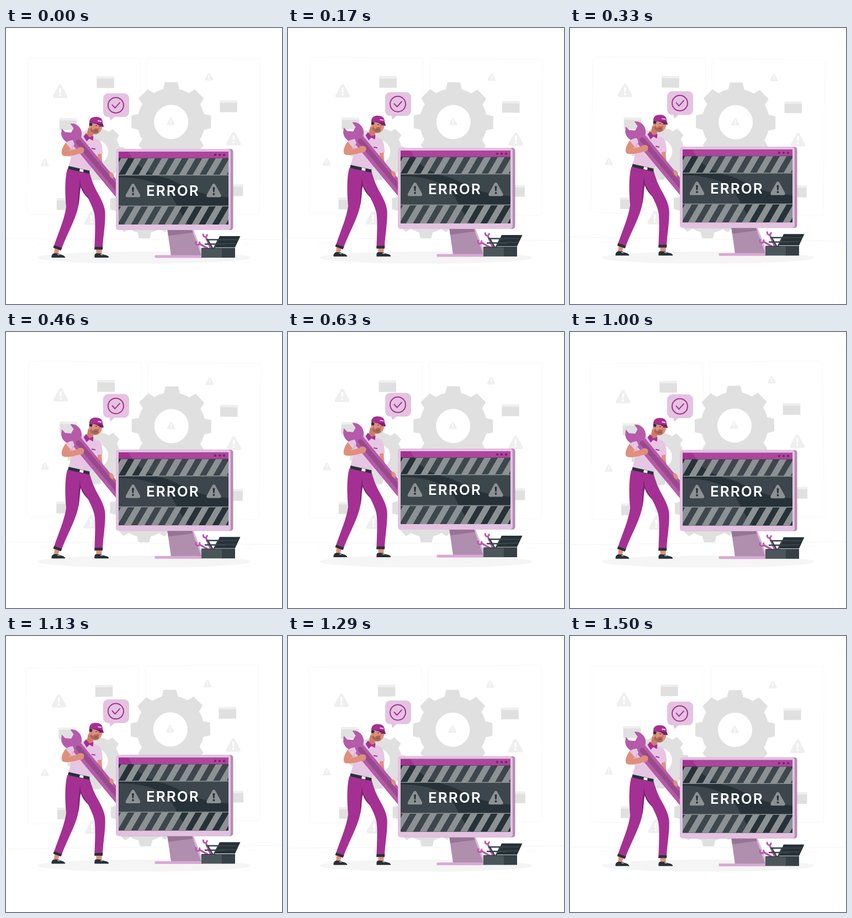
Recreate the animation shown at these times as an HTML page. Size 500x500 px, loop 1540 ms.

```html
<!DOCTYPE html>
<html lang="en">
<head>
<meta charset="utf-8">
<title>Error repair</title>
<style>
  html, body { margin: 0; width: 100%; height: 100%; overflow: hidden; background: #fff; }
  svg { display: block; width: 100vw; height: 100vh; }
  .word { font: 600 26px Inter, "Open Sans", sans-serif; letter-spacing: 2px; fill: #fff; }
  .dark { fill: #263238; }
  .main { fill: #a53093; }
  .pale { fill: #e4c3e0; }
  .skin { fill: #e08f7c; }
</style>
</head>
<body>
<svg viewBox="0 0 500 500" xmlns="http://www.w3.org/2000/svg">
  <defs>
    <path id="tooth" d="M-15 -57 L-11.5 -72 H11.5 L15 -57Z"/>
    <g id="gear" fill="#e0e0e0">
      <circle r="46" fill="none" stroke="#e0e0e0" stroke-width="30"/>
      <g id="teeth"></g>
    </g>
    <g id="box">
      <rect width="31.5" height="21" fill="#e0e0e0"/>
      <rect width="31.5" height="4" fill="#efefef"/>
    </g>
    <g id="warn">
      <path d="M-2.6 -11 Q0 -14.5 2.6 -11 L12.8 7.5 Q14.3 11.8 10.5 12 H-10.5 Q-14.3 11.8 -12.8 7.5Z"/>
      <path d="M-1.9 -6 H1.9 L1.2 3 H-1.2Z" fill="currentColor"/>
      <circle cy="6.4" r="1.9" fill="currentColor"/>
    </g>
    <clipPath id="screen"><rect x="204" y="224.5" width="199" height="132"/></clipPath>
    <clipPath id="bands"><path d="M204 236.5H403V267H204Z M204 323.5H403V356.5H204Z"/></clipPath>
  </defs>

  <g id="back">
    <g fill="none" stroke="#f8f8f8">
      <rect x="39" y="55" width="204" height="282.5" rx="4"/>
      <rect x="255" y="55" width="204.5" height="282.5" rx="4"/>
      <path d="M0 382.5H500" stroke="#f3f3f3"/>
      <path d="M54 391H88 M96 391H110 M430 391H450"/>
    </g>
    <use href="#gear" transform="translate(299 170)"/>
    <use href="#gear" transform="translate(163 225) scale(.71)"/>
    <use href="#gear" transform="translate(251 319) scale(.86)"/>
    <use href="#box" x="164" y="88"/>
    <use href="#box" x="387" y="131"/>
    <use href="#box" x="96.5" y="164"/>
    <use href="#box" x="92" y="309"/>
    <use href="#box" x="398" y="283"/>
    <g fill="#efefef" color="#fff">
      <use href="#warn" transform="translate(97.7 115.5)"/>
      <use href="#warn" transform="translate(412.3 200)"/>
      <use href="#warn" transform="translate(155 345)"/>
      <use href="#warn" transform="translate(70.3 244.5) scale(.55)"/>
      <use href="#warn" transform="translate(367.3 88) scale(.55)"/>
      <use href="#warn" transform="translate(298.3 169) scale(.55)"/>
    </g>
  </g>

  <ellipse cx="250" cy="416" rx="193" ry="11" fill="#f5f5f5"/>

  <g id="front">
    <!-- speech bubble -->
    <path class="pale" d="M187 160 L189 168.500 L198 160Z"/>
    <rect class="pale" x="176" y="118.700" width="47" height="43" rx="9"/>
    <g fill="none" stroke="#a53093" stroke-width="2">
      <circle cx="199" cy="140.300" r="14"/>
      <path d="M192.500 139.800 L197.500 145.300 L206 135.800" stroke-linecap="round" stroke-linejoin="round"/>
    </g>

    <!-- legs -->
    <path class="skin" d="M88 398 L97 401 L94 411 L87 411Z M163 400 H174 L173 411 H164Z"/>
    <path class="dark" d="M82.500 416.500 C82 411 85 409 88 408.500 L95 409 C99 412 106 411 107.500 416.500Z
      M160.500 416.500 C160 411 161 409 164 408.500 L172 409 C176 412 184 411 186 415 V416.500Z"/>
    <path d="M93 410.500 L97 411.500 M171 410.500 L175 411.500" stroke="#fff" stroke-width="1"/>
    <path class="main" d="M111 256 C106 275 107 303 109 325 C106 347 95 371 87 395 L101 400
      C109 377 127 346 131 323 C133 307 133 296 135 280 C142 298 156 320 159.500 335
      C163 347 161 380 160.500 398 H175 C176 378 181 350 179.500 333 C177 314 165 300 159 285
      C155 275 153 268 151 261Z"/>
    <path d="M134 274 C135 283 142 296 150 310 C143 304 138 297 135.500 289 C133 300 134 312 131 323
      C130 306 132 287 134 274Z" fill="#86237a"/>
    <path class="dark" d="M87 394 L101.500 399 L99.500 403.500 L85.500 398.500Z M160.500 397 H175.500 L175 402 H160Z"/>

    <!-- torso -->
    <path d="M141 196 L119 204 C121 222 118 238 113 251 L151 260 C158 250 168 242 173 229
      L175 228 C175 216 173 206 168 203 L154 197Z" fill="#e6c6e3"/>
    <path class="dark" d="M113.500 250.500 L151.500 259 L151 264.500 L112 256Z"/>
    <path d="M134 255.500 L140.500 257 L140 261.500 L133 260Z" fill="#fff"/>
    <path class="skin" d="M166 229 L173.500 228 C173 240 176 251 179 258 L193 266 L192 274 L183 272 L171 262 C167 251 166 240 166 229Z"/>
    <rect class="main" x="155" y="218" width="7" height="2" transform="rotate(12 158 219)"/>

    <!-- head -->
    <path d="M149 181 L146 196 C150 201 155 201 157 197 L160 188Z" fill="#cf7b69"/>
    <path class="skin" d="M151 172 C149 180 152 190 160 193 C168 194 174 187 175 177 L172 172Z"/>
    <path d="M151.500 176 L155 177 C155 183 156 185 158 185 C161 181 165 182 167.500 183 L168 189
      C165 194 156 193 152.500 186Z" fill="#a8685a"/>
    <path d="M160 187 L165.500 187" fill="none" stroke="#7a463c" stroke-width="1"/>
    <ellipse class="skin" cx="152.500" cy="180" rx="2.200" ry="3"/>
    <path class="dark" d="M151 171 L157 174 L155 178 L151 177Z"/>
    <path d="M162 177.500 L165 177 M169 178.500 L172 178.500" stroke="#263238" stroke-width="1"/>
    <path d="M167.500 178 L169 183 L166.500 183" fill="none" stroke="#c26754" stroke-width=".9"/>
    <path class="main" d="M151 173 C150 164 157 160.500 164 161.500 C171 162 175 165 175 172 L177 179
      C173 180 168 177 164 174 C160 173 155 172 151 173Z"/>
    <path d="M151 173 C157 171 169 173 175 174 L177 179 C173 180 168 177 164 174 C160 173 155 172 151 173Z" fill="#762069"/>
    <path d="M167 168.500 L172.500 169.500" stroke="#f3e3f2" stroke-width="1.600" stroke-linecap="round"/>
    <path class="main" d="M145 191 L140.500 197 L146 206 L151 201 L157.500 204.500 L158.500 196 L151 198.500Z"/>

    <!-- large wrench -->
    <path d="M126 202 L216 311" stroke="#b65aaa" stroke-width="20.500"/>
    <path d="M116.500 173.500 C127 172 136 180 137 190 C138 199 133 208 124 209 C111 211 101 203 100 192
      L101 182.500 L107 189 L118 190 L122.500 182Z" fill="#b65aaa"/>
    <path d="M131 207 L216 309" stroke="#984a8c" stroke-width="9" stroke-linecap="round"/>

    <!-- hands and near arm -->
    <path class="skin" d="M187 262 C191 260 195 264 195.500 269 L193 274 L188 269Z"/>
    <path class="skin" d="M109 207 L119 220 L113 222.500 L129 219 C133 214 140 216 141.500 220
      C142 226 138 229 132 228.500 C124 231 112 234 104 232 C98 229 101 217 109 207Z"/>
    <path d="M121 203.500 C115 204 111 206 108.500 209 L118.500 221 L124 211Z" fill="#e6c6e3"/>
    <path d="M118.500 221 L122 213" stroke="#c99dc5" stroke-width="1"/>

    <!-- monitor stand -->
    <path d="M333 364 H339 L358 413 H350Z" fill="#dcb6d9"/>
    <path d="M292 364 H336 L354 413 H299Z" fill="#b08fae"/>
    <path d="M292 364 H336 L339 371 L294 377Z" fill="#977495"/>
    <rect x="269.500" y="412" width="86" height="5" rx="1.500" fill="#d9a9d5"/>

    <!-- monitor -->
    <rect x="205" y="219.500" width="206.500" height="147" rx="5" fill="#b68cb4"/>
    <rect x="199" y="219.500" width="208" height="147" rx="5" fill="#e3c1e0"/>
    <g clip-path="url(#screen)">
      <rect class="dark" x="204" y="224" width="199" height="133"/>
      <rect class="main" x="204" y="224" width="199" height="12"/>
      <g fill="#fff" opacity=".1">
        <path d="M222 224 C234 249 252 263 285 271 S330 302 403 307 V224Z"/>
        <path d="M204 271 C250 270 288 284 300 305 S318 340 331 357 H204Z"/>
      </g>
      <g clip-path="url(#bands)"><path id="stripes" fill="#8c9194"/></g>
      <path d="M204 267H403 M204 323H403" stroke="#8c9194" stroke-width="1.500"/>
    </g>
    <g fill="#7a2069">
      <circle cx="379" cy="230.300" r="2.100"/><circle cx="387" cy="230.300" r="2.100"/><circle cx="395" cy="230.300" r="2.100"/>
    </g>
    <g fill="#8c9194" color="#263238">
      <use href="#warn" transform="translate(230 295)"/>
      <use href="#warn" transform="translate(376.500 295)"/>
    </g>
    <text class="word" x="254" y="304">ERROR</text>

    <!-- toolbox -->
    <g fill="none" stroke="#b65aaa" stroke-width="3.500">
      <path d="M362 379 L371 400 M350 391 L366 400"/>
      <path d="M358 373 A3.500 3.500 0 1 0 364 374 M345.500 387 A3.500 3.500 0 1 0 350 387.500" stroke-width="3"/>
    </g>
    <path class="dark" d="M387 377.500 H424.500 L415 398 H378Z"/>
    <path d="M384 384 H419 M381 391 H416" stroke="#4b565b"/>
    <path d="M364 384 H398 M361 392 H396 M366 385 L374 399 M384 385 L377 399" stroke="#37434a" stroke-width="2.500" stroke-linecap="round"/>
    <rect x="354" y="399" width="38" height="17.500" fill="#4b565b"/>
    <rect x="391" y="399" width="24" height="17.500" fill="#364147"/>
    <path d="M354 399.500 H415" stroke="#263238"/>
  </g>
</svg>
<script>
  const LOOP = 1540, STEPS = 37, PHASE = 0.045;
  const $ = id => document.getElementById(id);

  $("teeth").innerHTML = Array.from({ length: 8 }, (_, i) =>
    `<use href="#tooth" transform="rotate(${i * 45})"/>`).join("");

  // slanted hazard stripes for one band
  const band = (top, h, x0) => Array.from({ length: 11 }, (_, i) =>
    `M${x0 + i * 24.5} ${top}h12.5l${-h * 0.58} ${h}h-12.5Z`).join("");
  $("stripes").setAttribute("d", band(236, 31, 184.25) + band(323, 34, 184.25));

  // linear wave: 0 at the start, 1 halfway, 0 at the end
  const wave = p => 1 - Math.abs(1 - 2 * (((p % 1) + 1) % 1));

  function draw(ms) {
    const p = Math.floor((ms % LOOP) / LOOP * STEPS) / STEPS + PHASE;
    const lift = 0.5 - 10 * wave(p);
    const sway = 0.9 * (2 * wave(p + 0.25) - 1);
    $("front").setAttribute("transform", `translate(0 ${lift.toFixed(3)})`);
    $("back").setAttribute("transform", `rotate(${sway.toFixed(4)} 250 250)`);
  }

  const start = performance.now();
  function tick() {
    draw(performance.now() - start);
    requestAnimationFrame(tick);
  }
  draw(0);
  requestAnimationFrame(tick);
</script>
</body>
</html>
```
